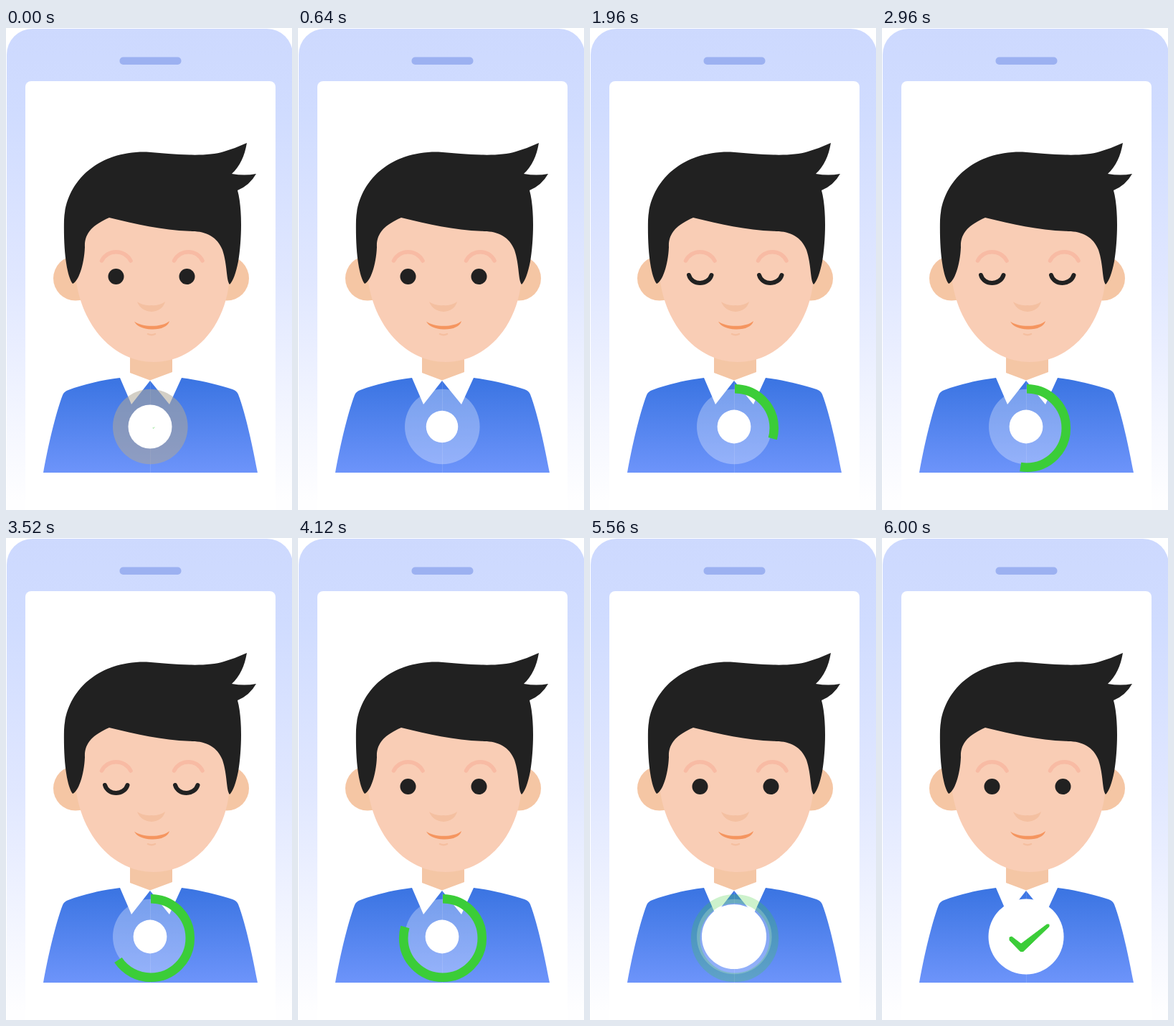
An HTML page that plays this animation: 399x671 px, repeating every 6720 ms.

```html
<!DOCTYPE html>
<html>
<head>
<meta charset="utf-8">
<style>
  html, body { margin: 0; width: 100%; height: 100%; overflow: hidden; background: #fff; }
  svg { display: block; width: 100%; height: 100%; }
</style>
</head>
<body>
<svg viewBox="0 0 399 671">
  <defs>
    <linearGradient id="caseFill" x2="0" y2="1">
      <stop stop-color="#cdd9fe"/>
      <stop offset=".17" stop-color="#d0dcff"/>
      <stop offset=".5" stop-color="#e0e7ff"/>
      <stop offset=".8" stop-color="#f5f7ff"/>
      <stop offset=".94" stop-color="#fefeff"/>
    </linearGradient>
    <linearGradient id="shirtFill" x2="0" y2="1">
      <stop stop-color="#3a74e2"/>
      <stop offset="1" stop-color="#6d94fa"/>
    </linearGradient>
  </defs>

  <!-- Phone -->
  <rect x="1" y="1" width="399" height="700" rx="36" fill="url(#caseFill)"/>
  <rect x="27" y="74" width="349" height="620" rx="8" fill="#fff"/>
  <rect x="158.5" y="40.5" width="86" height="10.5" rx="5" fill="#9cb1f1"/>

  <!-- Body -->
  <path fill="#f4c6a5" d="M173 445H232V479L201 490.500L173 480Z"/>
  <path fill="url(#shirtFill)" d="M52 619C58 585 69 537 79 511Q81 506 87 504C108 496 134 490 159 487L175 524L201 491L228 524L245 487C270 490 298 497 316 503Q322 505 324 510C335 539 344 583 351 619Z"/>
  <path stroke="#fff" stroke-opacity=".12" d="M201.500 492V619"/>

  <!-- Head -->
  <g fill="#f5c6a4">
    <circle cx="97" cy="348.500" r="31"/>
    <circle cx="308" cy="348.500" r="31"/>
  </g>
  <path fill="#f9cdb5" d="M97 250H312V346C308 414 263 465 206 465C151 465 105 416 97 346Z"/>
  <path fill="#212121" d="M93 356C85 345 80 312 81 267C83 215 127 171 196 172.500C236 176 279 180 304 172Q321 167 336 160C333 178 326 193 315 203Q333 206 349 203Q340 219 323 226C330 251 329 296 324 325Q319 350 312 357C307 351 309 330 302 309C295 291 279 283 260 283C220 282 182 273 144 264C121 274 109 286 110 305C109 330 101 353 93 356Z"/>
  <g fill="none" stroke="#f8bba4" stroke-width="5.500" stroke-linecap="round">
    <path d="M133.500 324C142 307.500 165 307.500 174 324"/>
    <path d="M234.500 324C243 307.500 266 307.500 274 324"/>
  </g>
  <path fill="#f4c0a1" d="M183 381Q191 387 203 386Q214 387 222 381Q218 394 203 395Q188 394 183 381Z"/>
  <path fill="#f5955f" d="M179 408.500C190 417 218 417 228 408C226 416 215 420 203 419.500C191 419 182 415 179 408.500Z"/>
  <path fill="none" stroke="#f5bfa0" stroke-width="2.500" stroke-linecap="round" d="M198 426Q203 428.500 208 426"/>

  <g id="openEyes" fill="#212121">
    <circle cx="153.500" cy="346" r="11"/>
    <circle cx="252.500" cy="346" r="11"/>
  </g>
  <g id="closedEyes" fill="none" stroke="#212121" stroke-width="6" stroke-linecap="round">
    <path d="M138 344C142 358.500 165 358.500 169.500 344"/>
    <path d="M236 344C240 358.500 263 358.500 267.500 344"/>
  </g>

  <!-- Shutter button -->
  <circle id="halo" cx="201.300" cy="555" r="52.300"/>
  <circle id="disc" cx="201" cy="555" fill="#fff"/>
  <circle id="ring" cx="202" cy="557" r="54.800" fill="none" stroke="#3bcd38" stroke-width="12.600"
    pathLength="360" transform="rotate(-90 202 557)"/>
  <path id="check" fill="#3bcd38" stroke="#3bcd38" stroke-linejoin="round"
    d="M178 556L181 555L194 565L230 538L233 538L233 541L197 575.500L193 575.500L178 560Z"/>
</svg>
<script>
  const LOOP = 6720;
  const $ = id => document.getElementById(id);
  const set = (id, attrs) => {
    for (const name in attrs) $(id).setAttribute(name, attrs[name]);
  };
  const show = (id, visible) => set(id, { visibility: visible ? 'visible' : 'hidden' });
  const progress = (t, from, to) => Math.min(1, Math.max(0, (t - from) / (to - from)));
  const ease = p => p * p * (3 - 2 * p);
  const mix = (a, b, p) => a + (b - a) * p;

  function draw(t) {
    const press = ease(progress(t, 0, 680));
    const settle = progress(t, 680, 1960);
    const done = ease(progress(t, 5320, 5680));
    const sweep = 360 * progress(t, 700, 5000);
    const grow = ease(progress(t, 5640, 6000));

    const closed = t >= 1500 && t < 5000 && t % 1000 >= 500;
    show('openEyes', !closed);
    show('closedEyes', closed);

    const tone = [175, 168, 152].map(c => Math.round(mix(c, 255, press)));
    set('halo', { fill: `rgb(${tone})`, 'fill-opacity': mix(.55, .29, press) });
    const radius = mix(30.5, 22.2, press) + settle * 1.2;
    set('disc', { r: mix(radius, 52.5, done) });

    show('ring', sweep > 0 && done < 1);
    set('ring', {
      'stroke-dasharray': sweep < 360 ? `${sweep} 720` : 'none',
      opacity: 1 - done
    });

    const scale = t < 40 ? .05 : grow;
    show('check', scale > 0);
    set('check', { transform: `translate(206 556.5) scale(${scale}) translate(-206 -556.5)` });
  }

  function tick() {
    draw(performance.now() % LOOP);
    requestAnimationFrame(tick);
  }
  tick();
</script>
</body>
</html>
```
